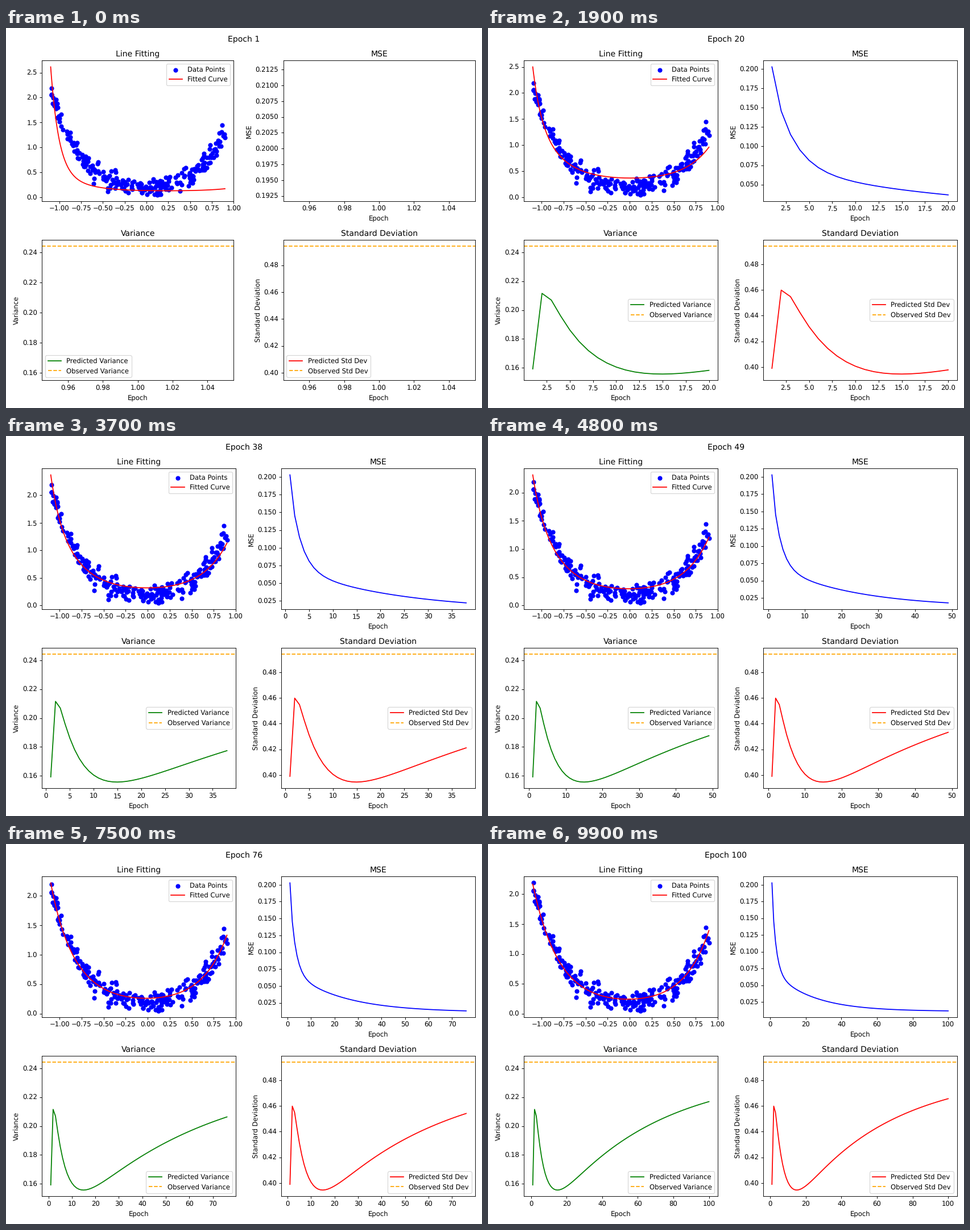
These frames come from a looping animation (837 by 669 pixels, 10000 ms). A matplotlib script:

```python
import numpy as np
import matplotlib.pyplot as plt
from matplotlib.animation import FuncAnimation

plt.rcParams["text.hinting"] = "none"

EPOCHS = 100
W, H, DPI = 837, 669, 83.7
LEFT, RIGHT, TOP, BOTTOM, ROW_GAP = 63.2, 824.6, 57.2, 620.5, 67.6
OBSERVED = 0.2443

# Training history: sums of decaying exponentials
epochs = np.arange(1, EPOCHS + 1)
k = epochs - 1
mse = 0.0111 + 0.0605 * np.exp(-0.0455 * k) + 0.119 * 0.64**k + 0.0122 * 0.03**k
var = 0.2375 - 0.1142 * np.exp(-0.0173 * k) + 0.121 * 0.822**k - 0.0851 * 0.155**k
std = np.sqrt(var)

# Fitted curve: a floor, a sharp and a soft fall on the left, a rise on the right
xs = np.linspace(-1.1, 0.9, 200)
basis = np.array([np.ones_like(xs), np.exp(-11 * (xs + 1.1)),
                  np.exp(-3.4 * (xs + 1.1)), np.exp(-3.5 * (0.9 - xs))])
START, MIDDLE, END = np.array([(0.118, 1.99, 0.50, 0.05),
                               (0.310, 0.90, 1.29, 0.65),
                               (0.140, 0.00, 2.03, 1.25)])
MID_EPOCH = 20


def fitted(e):
    if e <= MID_EPOCH:
        mid = MID_EPOCH - 1
        w = (mse[0] - mse[e - 1]) / (mse[0] - mse[mid])
        lift = np.sqrt(var[e - 1] / var[mid])
        return lift * (START + w * (MIDDLE - START)) @ basis
    w = np.expm1((MID_EPOCH - e) / 45) / np.expm1((MID_EPOCH - EPOCHS) / 45)
    return (MIDDLE + w * (END - MIDDLE)) @ basis


# Noisy samples of a quartic, plus a few outliers
rng = np.random.default_rng(7)
px = rng.uniform(-1.1, 0.9, 235)
noise = np.clip(rng.normal(0, 0.1, px.size), -0.2, 0.2)
py = 0.2 + 0.719 * px**2 + 0.087 * px**3 + 0.79 * px**4 + noise
py = np.clip(py, 0.06, 2.15)
outliers = [(-1.09, 2.19), (-0.61, 0.27), (-0.555, 0.71), (-0.445, 0.11),
            (-0.36, 0.54), (0.125, 0.046), (0.865, 1.445), (0.9, 1.19)]
px, py = np.vstack([np.column_stack([px, py]), outliers]).T

# Figure
fig, ((ax_fit, ax_mse), (ax_var, ax_std)) = plt.subplots(
    2, 2, figsize=((W + 0.001) / DPI, (H + 0.001) / DPI), dpi=DPI)
heading = fig.suptitle("Epoch 1")

ax_fit.set_title("Line Fitting")
ax_fit.scatter(px, py, color="blue", label="Data Points")
fit_line, = ax_fit.plot(xs, fitted(1), color="red", label="Fitted Curve")
ax_fit.set_xlim(-1.2, 1.0)
ax_fit.legend(loc="upper right")


def history_axes(ax, title, color, label=None):
    ax.set_title(title)
    ax.set_xlabel("Epoch")
    ax.set_ylabel(title)
    return ax.plot([1], [0], color=color, label=label)[0]


mse_line = history_axes(ax_mse, "MSE", "blue")
var_line = history_axes(ax_var, "Variance", "green", "Predicted Variance")
std_line = history_axes(ax_std, "Standard Deviation", "red", "Predicted Std Dev")
ax_var.axhline(OBSERVED, color="orange", ls="--", label="Observed Variance")
ax_std.axhline(OBSERVED**0.5, color="orange", ls="--", label="Observed Std Dev")
for ax in (ax_var, ax_std):
    ax.legend(loc="best")


def arrange():
    """Widen the column gap with the decimals of the MSE tick labels."""
    axis = ax_mse.yaxis
    label = axis.get_major_formatter().format_ticks(axis.get_majorticklocs())[0]
    gap = 57.6 + 7.4 * (len(label) - 2)
    fig.subplots_adjust(
        left=LEFT / W, right=RIGHT / W, top=1 - TOP / H, bottom=1 - BOTTOM / H,
        wspace=2 * gap / (RIGHT - LEFT - gap),
        hspace=2 * ROW_GAP / (BOTTOM - TOP - ROW_GAP))


def update(i):
    e = i + 1
    heading.set_text(f"Epoch {e}")
    curve = fitted(e)
    fit_line.set_ydata(curve)
    lo, hi = py.min(), max(py.max(), curve.max())
    pad = 0.05 * (hi - lo)
    ax_fit.set_ylim(lo - pad, hi + pad)
    for line, values in ((mse_line, mse), (var_line, var), (std_line, std)):
        line.set_data(epochs[:e], values[:e])
        line.axes.relim()
        line.axes.autoscale_view()
    arrange()
    return ()


update(0)

anim = FuncAnimation(fig, update, frames=EPOCHS, interval=100,
                     init_func=lambda: (), repeat=True, repeat_delay=0)
plt.show()
```
